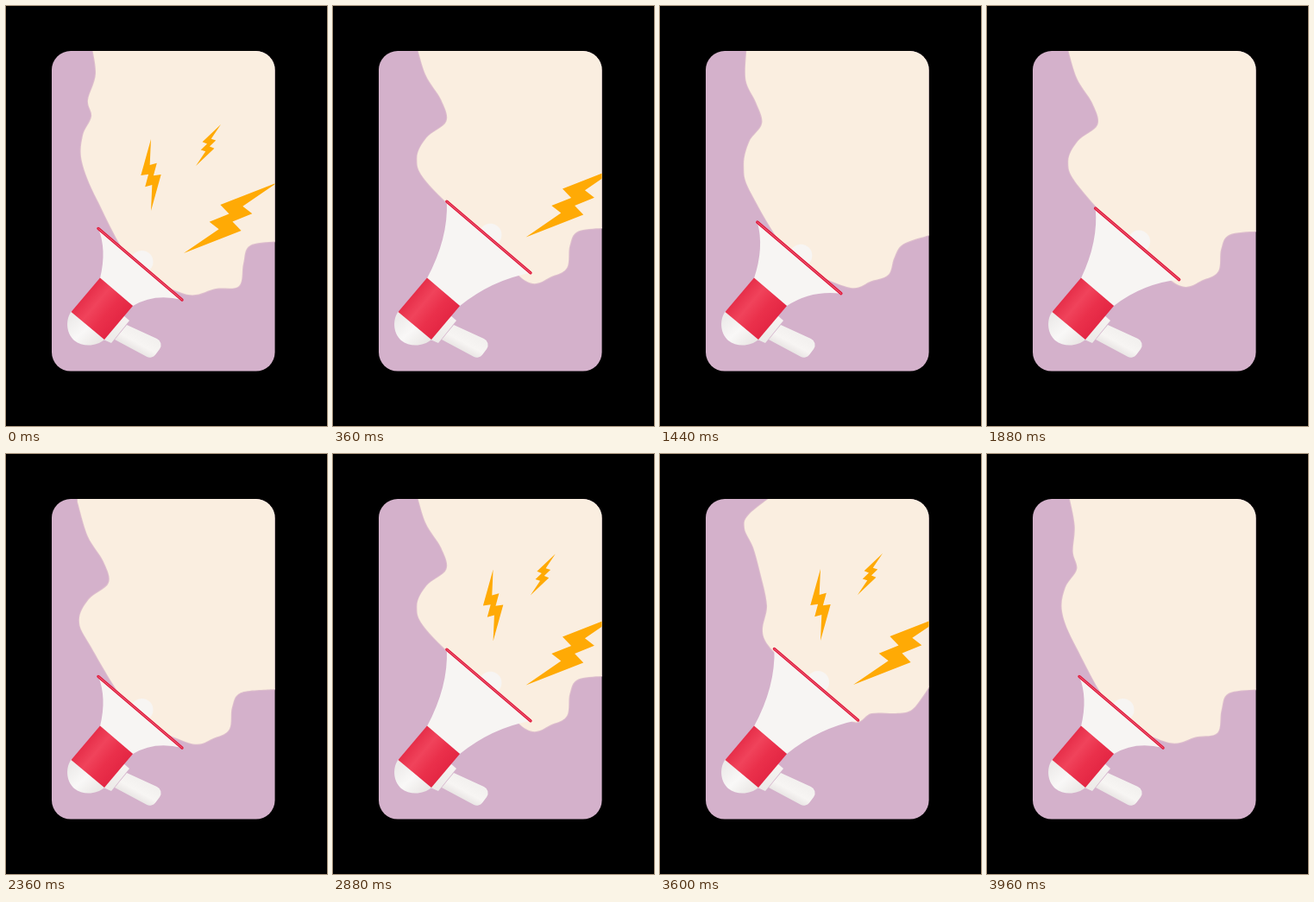
Write an HTML page with a canvas that moves like this. It is 372 px wide and 486 px high and loops after 4 s.

```html
<!DOCTYPE html>
<html lang="en">
<head>
<meta charset="utf-8">
<title>Megaphone</title>
<style>
html, body { margin: 0; width: 100%; height: 100%; overflow: hidden; background: #000; }
canvas { display: block; }
</style>
</head>
<body>
<canvas id="stage" width="372" height="486"></canvas>
<script>
const ctx = document.getElementById('stage').getContext('2d');
const LOOP = 4000, STEP = 40, PULSE = 800, WAVE = 1000;
const REACH = [25.5, -32];

// Key points of the cloud edge, left side then underside; the horn hides the gap.
const rest = {
  left: [[98, 40], [104, 78], [95, 109], [99, 128], [89, 150], [88, 180], [106, 225]],
  under: [[207, 333], [243, 327], [270, 324], [275, 298], [283, 277], [320, 272]]
};
const open = {
  left: [[95, 40], [107, 80], [125, 109], [131, 134], [108, 153], [97, 177], [109, 205]],
  under: [[224, 319], [254, 313], [271, 303], [274, 278], [284, 261], [320, 257]]
};
const burst = {
  left: [[142, 40], [104, 69], [98, 86], [108, 108], [116, 137], [124, 175], [122, 216]],
  under: [[222, 309], [245, 300], [273, 300], [290, 297], [302, 284], [322, 254]]
};
const shapes = [rest, open, burst];
const swellKeys = [[0, 0], [360, 1], [600, 2], [880, 1], [WAVE, 0]];

// Half of a bolt from its centre: along the axis, to its right.
const halfBolt = [[-.5, 0], [-.139, .016], [-.166, -.082], [.008, -.035], [-.005, -.141]];
const boltShape = [...halfBolt, ...halfBolt.map(([u, v]) => [-u, -v])];

const bolts = [
  { from: [206, 286], to: [315, 204], shift: [18, -19], shown: [[0, 240], [320, 620]] },
  { from: [168, 154], to: [168, 237], shift: [18, -21], shown: [[0, 160], [380, 620]] },
  { from: [220, 185], to: [249, 137], shift: [9, -22], shown: [[0, 160], [380, 620]] }
];

const mix = (a, b, k) => a + (b - a) * k;
const smooth = k => k * k * (3 - 2 * k);

// Horn stretch: rises and falls evenly, 0 to 1.
function extension(t) {
  const x = 1 - Math.abs((t + PULSE - 20) % PULSE - 400) / 400;
  const k = Math.min(1, Math.max(0, (x - .15) / .82));
  const half = v => 2 ** 1.5 * v ** 2.5;
  return k < .5 ? half(k) : 1 - half(1 - k);
}

// Cloud stage: 0 at rest, 1 open, 2 burst.
function swell(t) {
  const ph = t % WAVE;
  const i = swellKeys.findIndex(k => k[0] > ph);
  const [t0, a] = swellKeys[i - 1], [t1, b] = swellKeys[i];
  return mix(a, b, smooth((ph - t0) / (t1 - t0)));
}

function polygon(pts, fill) {
  ctx.beginPath();
  pts.forEach(p => ctx.lineTo(...p));
  ctx.closePath();
  ctx.fillStyle = fill;
  ctx.fill();
}

function line(a, b, width, color) {
  ctx.beginPath();
  ctx.moveTo(...a);
  ctx.lineTo(...b);
  ctx.lineWidth = width;
  ctx.strokeStyle = color;
  ctx.stroke();
}

function gradient(a, b, colors) {
  const g = ctx.createLinearGradient(...a, ...b);
  colors.forEach((c, i) => g.addColorStop(i / (colors.length - 1), c));
  return g;
}

function curve(p) {
  const last = p.length - 1;
  ctx.moveTo(...p[0]);
  for (let i = 0; i < last; i++) {
    const p0 = p[Math.max(0, i - 1)], p1 = p[i], p2 = p[i + 1], p3 = p[Math.min(last, i + 2)];
    ctx.bezierCurveTo(p1[0] + (p2[0] - p0[0]) / 6, p1[1] + (p2[1] - p0[1]) / 6,
      p2[0] - (p3[0] - p1[0]) / 6, p2[1] - (p3[1] - p1[1]) / 6, ...p2);
  }
}

// The less the cloud is swollen, the more it follows the horn.
function cloudSide(side, w, e) {
  const i = Math.min(1, Math.floor(w));
  const place = (s, n, axis) =>
    shapes[s][side][n][axis] + (e - Math.min(s, .95)) * (1 - s / 2) * REACH[axis];
  return shapes[i][side].map((_, n) =>
    [0, 1].map(axis => mix(place(i, n, axis), place(i + 1, n, axis), w - i)));
}

function drawCloud(t, e) {
  const w = swell(t);
  const behindHorn = [148 + REACH[0] * e, 298 + REACH[1] * e];
  const pts = [...cloudSide('left', w, e), behindHorn, ...cloudSide('under', w, e)];
  ctx.beginPath();
  curve(pts);
  ctx.lineTo(340, pts[pts.length - 1][1]);
  ctx.lineTo(340, 20);
  ctx.lineTo(pts[0][0], 20);
  ctx.closePath();
  ctx.lineWidth = 2;
  ctx.strokeStyle = 'rgba(225,196,206,.7)';
  ctx.stroke();
  ctx.fillStyle = '#faeee0';
  ctx.fill();
}

function drawBolt({ from, to, shift, shown }, ph, e) {
  if (!shown.some(([on, off]) => ph >= on && ph < off)) return;
  const dx = to[0] - from[0], dy = to[1] - from[1];
  const x = from[0] + dx / 2 + shift[0] * e, y = from[1] + dy / 2 + shift[1] * e;
  polygon(boltShape.map(([u, v]) => [x + dx * u - dy * v, y + dy * u + dx * v]), '#ffaa05');
}

function drawHandle() {
  ctx.beginPath();
  ctx.moveTo(126, 386);
  ctx.lineTo(140, 369);
  ctx.arcTo(184, 389, 169, 409, 8);
  ctx.arcTo(169, 409, 126, 386, 8);
  ctx.closePath();
  ctx.fillStyle = gradient([158, 380], [147, 400], ['#f3f1ef', '#f7f5f3', '#e6e2e1']);
  ctx.fill();
  polygon([[135, 357], [143, 364], [122, 390], [113, 386]],
    gradient([136, 360], [118, 388], ['#f5f3f1', '#eceae8']));
}

function drawBody() {
  ctx.beginPath();
  ctx.moveTo(76, 353);
  ctx.bezierCurveTo(69, 362, 69, 378, 79, 387);
  ctx.bezierCurveTo(89, 395, 105, 394, 114, 386);
  ctx.closePath();
  ctx.fillStyle = gradient([76, 360], [105, 392], ['#edebea', '#f9f8f7', '#eae7e5']);
  ctx.fill();
  polygon([[109, 314.5], [147, 347], [114, 386], [75.5, 354]],
    gradient([92, 334], [130, 366], ['#e62e49', '#f0435b', '#ea304b', '#e42744']));
}

function drawHorn(e) {
  const dx = REACH[0] * e, dy = REACH[1] * e;
  const left = [107 + dx, 257.5 + dy], right = [204 + dx, 340 + dy];
  ctx.fillStyle = '#f7f5f3';
  ctx.beginPath();
  ctx.arc(157.5 + dx, 296 + dy, 13, 0, 7);
  ctx.fill();
  ctx.beginPath();
  ctx.moveTo(...left);
  ctx.quadraticCurveTo(117 + 17 * e, 282 - 13 * e, 109, 315);
  ctx.lineTo(147, 347);
  ctx.quadraticCurveTo(172 + 12 * e, 332 - 15 * e, ...right);
  ctx.closePath();
  ctx.fill();
  return [left, right];
}

function draw(t) {
  const e = extension(t);
  ctx.fillStyle = '#000';
  ctx.fillRect(0, 0, 372, 486);
  ctx.save();
  ctx.beginPath();
  ctx.roundRect(53, 52, 258.6, 370.6, 22);
  ctx.clip();
  ctx.fillStyle = '#d4b1cb';
  ctx.fillRect(53, 52, 259, 371);
  drawCloud(t, e);
  bolts.forEach(b => drawBolt(b, t % PULSE, e));
  drawHandle();
  const rim = drawHorn(e);
  drawBody();
  ctx.lineCap = 'round';
  line(...rim, 3.5, '#e01c3e');
  line(...rim, 1, 'rgba(245,138,155,.7)');
  ctx.restore();
}

function tick() {
  const t = performance.now() % LOOP;
  draw(Math.floor(t / STEP) * STEP);
  requestAnimationFrame(tick);
}
tick();
</script>
</body>
</html>
```
